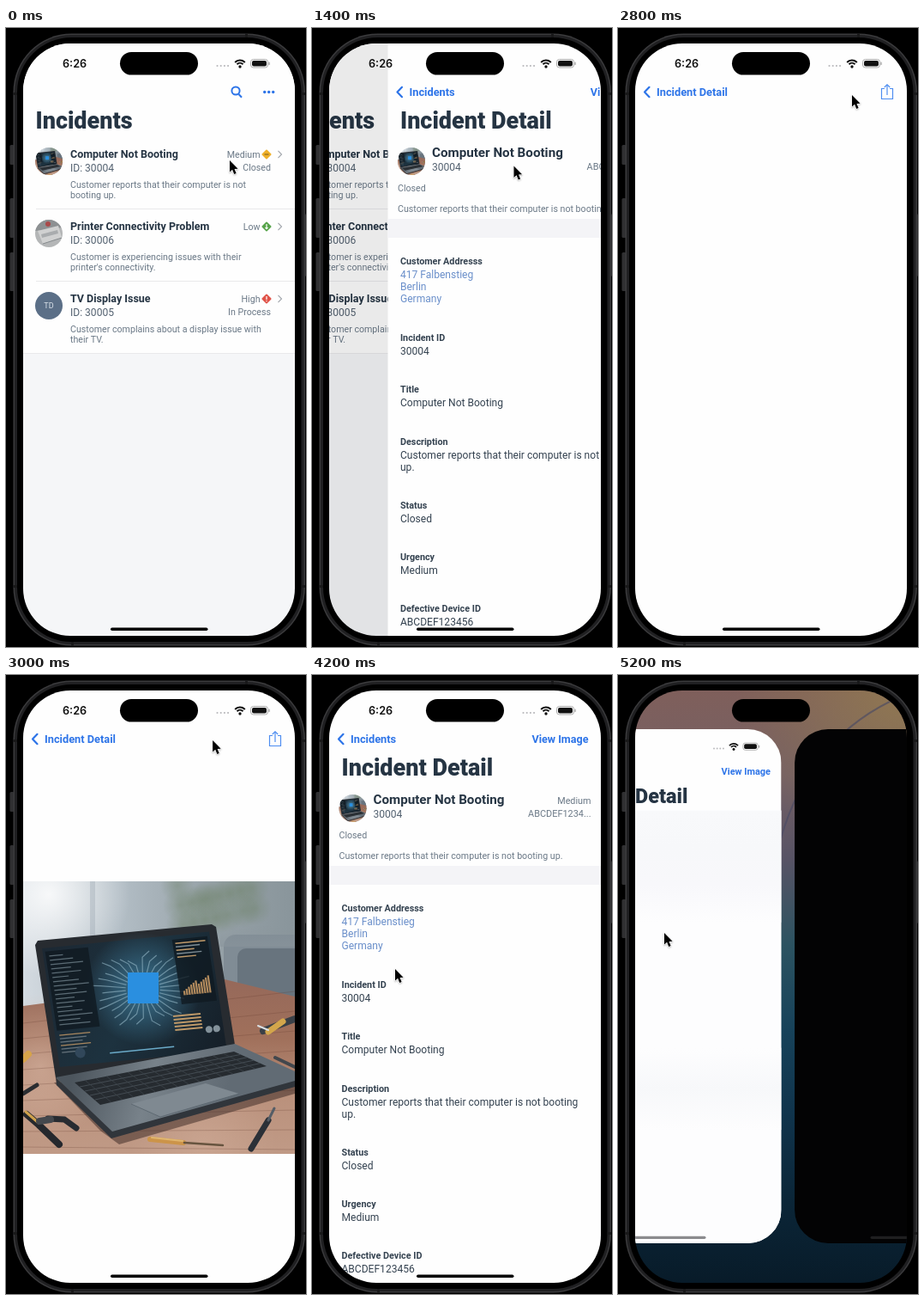
Write an HTML page with a canvas that moves like this. It is 350 px wide and 720 px high and loops after 5400 ms.

```html
<!DOCTYPE html>
<html lang="en">
<head>
<meta charset="utf-8">
<title>Incidents app</title>
<style>
html, body { margin: 0; width: 100%; height: 100%; overflow: hidden; background: #000; }
canvas { display: block; width: 350px; height: 720px; }
</style>
</head>
<body>
<canvas id="stage"></canvas>
<script>
const W = 350, H = 720, LOOP = 5400, STEP = 200;
const SCREEN = { x: 20, y: 18, w: 317, h: 689 };
const FONT = 'Roboto, "Open Sans", sans-serif';
const BLUE = '#2d74e8', INK = '#253443', SOFT = '#344250', GRAY = '#6a7886';

const canvas = document.getElementById('stage');
const dpr = window.devicePixelRatio || 1;
canvas.width = W * dpr;
canvas.height = H * dpr;
const c = canvas.getContext('2d');

// ---- helpers ----
function rr(x, y, w, h, r, fill) {
  c.beginPath();
  c.roundRect(x, y, w, h, r);
  if (fill) { c.fillStyle = fill; c.fill(); }
}
function rect(x, y, w, h, fill) {
  c.fillStyle = fill;
  c.fillRect(x, y, w, h);
}
function disc(x, y, r, fill) {
  c.beginPath();
  c.arc(x, y, r, 0, Math.PI * 2);
  c.fillStyle = fill;
  c.fill();
}
function trace(p) {
  c.beginPath();
  for (let i = 0; i < p.length; i += 2) c.lineTo(p[i], p[i + 1]);
}
function poly(fill, ...p) {
  trace(p);
  c.closePath();
  c.fillStyle = fill;
  c.fill();
}
function line(color, width, ...p) {
  trace(p);
  c.strokeStyle = color;
  c.lineWidth = width;
  c.stroke();
}
function text(s, x, y, size, color = INK, weight = 400, align = 'left', font = FONT) {
  c.font = `${weight} ${size}px ${font}`;
  c.fillStyle = color;
  c.textAlign = align;
  c.fillText(s, x, y);
}
function fade(x0, y0, x1, y1, ...colors) {
  const g = c.createLinearGradient(x0, y0, x1, y1);
  colors.forEach((k, i) => g.addColorStop(i / (colors.length - 1), k));
  return g;
}
function glow(x, y, r, rgb, a) {
  const g = c.createRadialGradient(x, y, 0, x, y, r);
  g.addColorStop(0, `rgba(${rgb},${a})`);
  g.addColorStop(1, `rgba(${rgb},0)`);
  rect(x - r, y - r, r * 2, r * 2, g);
}
function scoped(fn) {
  c.save();
  fn();
  c.restore();
}
const clamp = v => Math.max(0, Math.min(1, v));
const ease = (t, a, b) => 1 - Math.pow(1 - clamp((t - a) / (b - a)), 3);

// ---- pictures ----
function display() {
  // 195 x 138 local units, sheared onto the lid
  c.transform(1, -0.1, 0.15, 1, 22, 78);
  rect(0, 0, 195, 138, fade(0, 0, 195, 138, '#1c2833', '#1d323f', '#151e27'));
  glow(109, 58, 66, '80,160,200', 0.6);
  for (let i = 0; i < 30; i++) {
    const a = i / 30 * Math.PI * 2, len = 46 + i * 37 % 22;
    const dx = Math.cos(a), dy = Math.sin(a) * 0.8;
    const x = 109 + dx * len * 0.75, y = 58 + dy * len * 0.75;
    line('rgba(150,185,200,.6)', 1.2, 109 + dx * 20, 58 + dy * 20, x, y, x + Math.sign(dx) * 9, y + dy * 8);
  }
  rect(3, 4, 50, 92, 'rgba(16,25,33,.8)');
  for (let i = 0; i < 17; i++) rect(7, 9 + i * 5, 16 + i * 11 % 26, 1.2, 'rgba(140,160,170,.6)');
  for (let i = 0; i < 6; i++) rect(5, 101 + i * 4, 36 - i * 5 % 14, 1.3, i % 3 ? '#65727b' : '#a8875f');
  disc(26, 124, 6, '#31475a');
  rect(151, 5, 41, 75, 'rgba(16,25,33,.8)');
  for (let i = 0; i < 5; i++) rect(154, 9 + i * 4, 35 - i * 7 % 15, 1.4, i % 2 ? '#7b8b94' : '#c09a6a');
  for (let i = 0; i < 11; i++) {
    const h = 5 + i * 1.1 + i * 7 % 6;
    rect(155 + i * 3, 70 - h, 2.2, h, '#b0895c');
  }
  for (let i = 0; i < 5; i++) rect(139, 92 + i * 4, 32, 2, '#bd9868');
  disc(178, 112, 4, '#83919a');
  disc(187, 112, 4, '#83919a');
  rect(60, 127, 75, 1.5, '#6aaac8');
}

function photo() {
  rect(0, 0, 317, 317, fade(0, 0, 317, 0, '#d3dae0', '#b4bfc7', '#98a3a9', '#89959b'));
  glow(30, 15, 95, '255,255,255', 0.85);
  rect(78, 0, 6, 70, 'rgba(150,162,172,.35)');
  for (let i = 0; i < 16; i++) glow(180 + i * 29 % 100, 5 + i * 17 % 48, 20, '112,132,108', 0.45);
  rr(234, 62, 100, 70, 14, '#808c95');
  rr(250, 78, 80, 60, 10, '#68747e');
  rect(230, 50, 87, 26, fade(0, 50, 0, 76, 'rgba(138,149,156,0)', 'rgba(138,149,156,.6)'));
  poly(fade(0, 115, 0, 317, '#96695a', '#a0705b', '#ba917c', '#c09a86'), 0, 145, 235, 114, 317, 134, 317, 317, 0, 317);
  glow(20, 215, 85, '222,190,172', 0.55);
  glow(210, 305, 85, '215,180,160', 0.4);
  for (let i = 0; i < 9; i++) line('rgba(95,58,44,.25)', 1.2, 0, 165 + i * 18, 317, 128 + i * 23);
  poly('rgba(55,36,32,.5)', 36, 234, 90, 290, 112, 306, 317, 247, 317, 232);
  poly('#272b30', 14, 74, 17, 69, 220, 50, 225, 53, 247, 190, 38, 229);
  scoped(display);
  poly(fade(60, 220, 230, 270, '#4c555d', '#78828a', '#616b74'), 38, 228, 247, 189, 317, 221, 317, 234, 104, 292);
  poly('#30353b', 38, 228, 104, 291, 317, 232, 317, 239, 103, 299, 39, 237);
  poly('#262b30', 60, 234, 246, 198, 284, 215, 90, 260);
  for (let i = 1; i < 5; i++) line('#444c53', 1, 60 + i * 6, 234 + i * 5, 246 + i * 7.6, 198 + i * 3.4);
  for (let i = 1; i < 15; i++) line('#3b4349', 0.8, 60 + i * 12.4, 234 - i * 2.4, 90 + i * 12.9, 260 - i * 3);
  poly('#7f8991', 126, 259, 213, 235, 252, 247, 160, 274);
  line('#59646d', 0.8, 126, 259, 160, 274, 252, 247);
  c.lineCap = 'round';
  line('#25282d', 8, 4, 271, 18, 283, 42, 306);
  line('#282c31', 7, 29, 276, 48, 277, 62, 287);
  line('#cfa24c', 3, 3, 268, 18, 281);
  line('#44484d', 8, 19, 279, 32, 277);
  line('#d6a349', 8, 0, 207, 6, 201);
  line('#2a2d31', 5, 0, 247, 16, 237);
  line('#cc9449', 6, 148, 300, 187, 304);
  line('#e0b670', 2, 150, 298, 186, 302);
  line('#67543f', 2.5, 188, 304, 233, 307);
  line('#2b3037', 7, 266, 311, 286, 278);
  line('#555d66', 3, 286, 278, 293, 264);
  line('#3a4047', 8, 280, 174, 317, 160);
  line('#d3a64b', 7, 286, 175, 303, 163);
  line('#d9dee2', 2, 274, 168, 286, 173);
  line('#42474d', 4, 294, 205, 317, 216);
  // plain square on the chip
  rect(122, 106, 36, 36, '#2a8fe0');
}

function printer() {
  rect(-16, -16, 32, 32, '#b4b6b7');
  poly('#8d9193', -16, -16, 16, -16, 16, -7, -16, -3);
  poly('#d0d1d1', -13, -3, 11, -9, 15, 5, -7, 12);
  poly('#a9acae', -9, 1, 10, -4, 11, 0, -8, 5);
  line('#858a8d', 1, -7, 12, 15, 5);
  disc(-1, -11, 3, '#a94a4a');
}

function avatar(x, y, draw) {
  scoped(() => {
    c.beginPath();
    c.arc(x, y, 16, 0, Math.PI * 2);
    c.clip();
    c.translate(x, y);
    draw();
  });
}
const laptopThumb = () => {
  c.scale(0.108, 0.108);
  c.translate(-158, -160);
  photo();
};

// ---- interface parts ----
function statusBar() {
  text('6:26', 66, 46, 12.7, '#111', 600, 'left', 'Inter, sans-serif');
  for (let i = 0; i < 4; i++) disc(246.5 + i * 4.2, 44, 1.1, '#b9b9bc');
  c.strokeStyle = '#111';
  c.lineWidth = 2;
  for (const r of [4.8, 8]) {
    c.beginPath();
    c.arc(273, 45.5, r, -Math.PI * 0.76, -Math.PI * 0.24);
    c.stroke();
  }
  disc(273, 45, 1.7, '#111');
  rr(285.5, 36.5, 20, 9.5, 3);
  c.strokeStyle = '#aaa';
  c.lineWidth = 1;
  c.stroke();
  rr(287, 38, 17, 6.5, 2, '#111');
  rr(306.5, 39.5, 1.3, 3.5, 0.6, '#aaa');
}

const homeBar = color => rr(122, 697.5, 113.5, 3.6, 1.8, color);

function back(label, alpha = 1) {
  scoped(() => {
    c.globalAlpha = alpha;
    c.lineCap = c.lineJoin = 'round';
    line(BLUE, 2.2, 36.5, 68.8, 31, 74.5, 36.5, 80.2);
    text(label, 45, 79, 12.8, BLUE, 700);
  });
}

const heading = s => text(s, 34.5, 117, 27, INK, 900);

function page(fill) {
  rect(SCREEN.x, SCREEN.y, SCREEN.w, SCREEN.h, fill);
}

const rows = [
  { title: 'Computer Not Booting', id: 30004, level: 'Medium', color: '#eeb02b', state: 'Closed',
    body: ['Customer reports that their computer is not', 'booting up.'], pic: laptopThumb },
  { title: 'Printer Connectivity Problem', id: 30006, level: 'Low', color: '#58a44b', state: '',
    body: ['Customer is experiencing issues with their', "printer's connectivity."], pic: printer },
  { title: 'TV Display Issue', id: 30005, level: 'High', color: '#e05348', state: 'In Process',
    body: ['Customer complains about a display issue with', 'their TV.'],
    pic: () => { rect(-16, -16, 32, 32, '#5b6f87'); text('TD', 0, 3.2, 9, '#dce3ea', 400, 'center'); } }
];

function row(r, i) {
  const y = i * 84, left = i === 2 ? 20 : 35;
  avatar(50, 155 + y, r.pic);
  text(r.title, 75, 151 + y, 12.5, INK, 700);
  text('ID: ' + r.id, 75, 167 + y, 12.05, '#536170');
  r.body.forEach((s, k) => text(s, 75, 185.5 + y + k * 12.3, 10.65, GRAY));
  text(r.level, 296.5, 150.5 + y, 10.65, GRAY, 400, 'right');
  text(r.state, 309, 165.5 + y, 10.65, GRAY, 400, 'right');
  scoped(() => {
    c.translate(304, 147 + y);
    c.rotate(Math.PI / 4);
    rr(-4.2, -4.2, 8.4, 8.4, 1, r.color);
  });
  if (i === 0) rect(301.5, 146.4, 5, 1.2, '#8b6a20');
  else rect(303.4, 144 + y, 1.2, i === 1 ? 6 : 4, '#fff');
  if (i === 1) poly('#fff', 301.8, 148 + y, 306.2, 148 + y, 304, 150.5 + y);
  if (i === 2) rect(303.4, 149 + y, 1.2, 1.2, '#fff');
  line('#a0a5ab', 1.1, 317.5, 142.8 + y, 321.5, 147 + y, 317.5, 151.2 + y);
  rect(left, 210 + y, 337 - left, 1, '#e9e9eb');
}

function listPage() {
  page('#f5f6f8');
  rect(20, 18, 317, 361, '#fefefe');
  line(BLUE, 2, 271.5, 77, 275, 80.8);
  c.beginPath();
  c.arc(268, 73, 4.6, 0, Math.PI * 2);
  c.stroke();
  for (let i = 0; i < 3; i++) disc(301.7 + i * 5, 74.5, 1.7, BLUE);
  heading('Incidents');
  rows.forEach(row);
}

const fields = [
  [363.5, 'Incident ID', '30004'],
  [424, 'Title', 'Computer Not Booting'],
  [484.5, 'Description', 'Customer reports that their computer is not booting', 'up.'],
  [558.5, 'Status', 'Closed'],
  [619, 'Urgency', 'Medium'],
  [679, 'Defective Device ID', 'ABCDEF123456']
];

function field(y, label, color, values) {
  text(label, 34.5, y, 10.8, SOFT, 700);
  values.forEach((v, k) => text(v, 34.5, y + 16 + k * 14.2, 12.05, color));
}

function detailBody(bar) {
  avatar(47.5, 155, laptopThumb);
  text('Computer Not Booting', 71.5, 150, 15.2, INK, 700);
  text('30004', 71.5, 166, 12.05, '#536170');
  text('Medium', 325.5, 149.5, 10.8, GRAY, 400, 'right');
  text('ABCDEF1234...', 325.5, 164.5, 10.9, GRAY, 400, 'right');
  text('Closed', 31.5, 190, 10.65, GRAY);
  text('Customer reports that their computer is not booting up.', 31.5, 214, 10.65, GRAY);
  rect(20, 222, 317, 22, '#f4f4f7');
  field(275, 'Customer Addresss', '#6a8fca', ['417 Falbenstieg', 'Berlin', 'Germany']);
  for (const [y, label, ...values] of fields) field(y, label, SOFT, values);
  if (bar > 0) rr(332.6, 130, 2.4, 417, 1.2, `rgba(150,150,155,${bar * 0.8})`);
}

function detailPage(bar = 0, frost = 0) {
  page('#fefefe');
  back('Incidents');
  text('View Image', 322.5, 79, 12.6, BLUE, 700, 'right');
  heading('Incident Detail');
  if (frost < 1) detailBody(bar);
  if (frost > 0) scoped(() => {
    c.globalAlpha = frost;
    rect(20, 127, 317, 580, '#fdfdfe');
    rect(20, 127, 317, 150, fade(0, 127, 0, 277, '#f8f9fb', '#f7f8fa', '#f8f8fb', '#fdfdfe'));
    rect(20, 445, 317, 110, fade(0, 445, 0, 555, '#fdfdfe', '#f7f8fa', '#fdfdfe'));
  });
}

function imagePage(loaded, pressed) {
  page('#fefefe');
  back('Incident Detail', pressed ? 0.22 : 1);
  const blue = '#4d8df0';
  line(blue, 1.2, 311, 70.5, 307.5, 70.5, 307.5, 82.5, 320.5, 82.5, 320.5, 70.5, 317, 70.5);
  line(blue, 1.2, 314, 78, 314, 66);
  line(blue, 1.2, 310.8, 69, 314, 65.8, 317.2, 69);
  if (loaded) scoped(() => {
    c.beginPath();
    c.rect(20, 240, 317, 317);
    c.clip();
    c.translate(20, 240);
    photo();
  });
}

function slide(under, over, p) {
  scoped(() => {
    c.translate(-SCREEN.w * 0.3 * p, 0);
    under();
  });
  rect(20, 18, 317, 689, `rgba(0,0,0,${0.1 * p})`);
  scoped(() => {
    c.translate(SCREEN.w * (1 - p), 0);
    over();
  });
}

function wallpaper() {
  page(fade(0, 18, 0, 707, '#7f5f5b', '#756064', '#575365', '#2c5361', '#17425a', '#10344c', '#0b2638', '#081b29'));
  glow(337, 18, 200, '150,128,78', 0.75);
  c.beginPath();
  c.moveTo(190, 190);
  c.quadraticCurveTo(225, 70, 330, 25);
  c.strokeStyle = 'rgba(75,75,100,.65)';
  c.lineWidth = 2;
  c.stroke();
}

function switcher(p) {
  wallpaper();
  const s = 1 - 0.132 * p, x = 20 - 104.6 * p, y = 18 + 45 * p;
  const card = (left, draw) => scoped(() => {
    c.translate(left, y);
    c.scale(s, s);
    c.translate(-20, -18);
    rr(20, 18, 317, 689, 51 - 6 * p);
    c.clip();
    draw();
  });
  card(x, () => {
    detailPage(0, clamp(p * 1.1));
    statusBar();
    homeBar(p < 1 ? '#444' : '#8b8b8e');
  });
  card(x + SCREEN.w * s + 15.5, () => {
    page('#030304');
    homeBar('#1f1f20');
  });
}

// ---- phone and pointer ----
function phone() {
  rect(0, 0, W, H, '#000');
  for (const [y, h] of [[136, 23], [198, 46], [261, 45]]) rr(4.5, y, 5, h, 1.5, '#303032');
  rr(346, 216, 4, 73, 1.5, '#2a2a2c');
  rr(8.5, 6.5, 340.5, 712, 68, '#3b3b3d');
  rr(10, 8, 337.5, 709, 66.5, '#202022');
  rr(13, 11, 331.5, 703, 63.5, '#000');
  for (const y of [75, 648]) {
    rect(8.5, y, 4.5, 3, '#19191a');
    rect(344.5, y, 4.5, 3, '#19191a');
  }
  rect(279, 6.5, 3, 4.5, '#19191a');
  rect(76, 714, 3, 4.5, '#19191a');
}

function cursor(x, y) {
  scoped(() => {
    c.translate(x, y);
    const shape = [0, 0, 0, 13.6, 3.1, 10.8, 5.2, 16, 7.6, 15, 5.5, 10, 9.6, 9.8];
    c.shadowColor = 'rgba(0,0,0,.3)';
    c.shadowBlur = 2 * dpr;
    c.shadowOffsetY = dpr;
    c.lineJoin = 'round';
    trace(shape);
    c.closePath();
    c.strokeStyle = '#fff';
    c.lineWidth = 1.2;
    c.stroke();
    c.shadowColor = 'transparent';
    poly('#000', ...shape);
  });
}

const path = [
  [0, 261, 154], [1000, 235.5, 160.5], [1400, 235.5, 160.5], [2000, 286, 78], [2400, 286, 78],
  [2800, 273, 78], [3600, 69, 65], [3800, 69, 65], [4200, 97, 342], [4800, 150, 690], [5200, 54, 300]
];
function pointer(t) {
  let i = 0;
  while (i < path.length - 2 && path[i + 1][0] <= t) i++;
  const [t0, x0, y0] = path[i], [t1, x1, y1] = path[i + 1];
  const u = clamp((t - t0) / (t1 - t0)), k = u * u * (3 - 2 * u);
  return [x0 + (x1 - x0) * k, y0 + (y1 - y0) * k];
}

function scene(t) {
  if (t >= 5000) return switcher(ease(t, 4800, 5200));
  const viewer = () => imagePage(t >= 3000, t >= 3600);
  const detail = () => detailPage(t >= 1600 && t < 2600 ? 1 : 0);
  if (t <= 1200) listPage();
  else if (t < 1800) slide(listPage, detail, ease(t, 1200, 1700));
  else if (t <= 2400) detail();
  else if (t < 2800) slide(detail, viewer, ease(t, 2400, 2800));
  else if (t <= 3600) viewer();
  else if (t < 4000) slide(detail, viewer, 1 - ease(t, 3600, 4000));
  else detail();
  statusBar();
  homeBar('#000');
}

function draw(t) {
  c.setTransform(dpr, 0, 0, dpr, 0, 0);
  phone();
  scoped(() => {
    rr(SCREEN.x, SCREEN.y, SCREEN.w, SCREEN.h, 55);
    c.clip();
    scene(t);
    rr(133, 28, 91, 26.5, 13.2, '#000');
  });
  cursor(...pointer(t));
}

const start = performance.now();
function tick() {
  const t = (performance.now() - start) % LOOP;
  draw(Math.floor(t / STEP) * STEP);
  requestAnimationFrame(tick);
}
tick();
</script>
</body>
</html>
```
